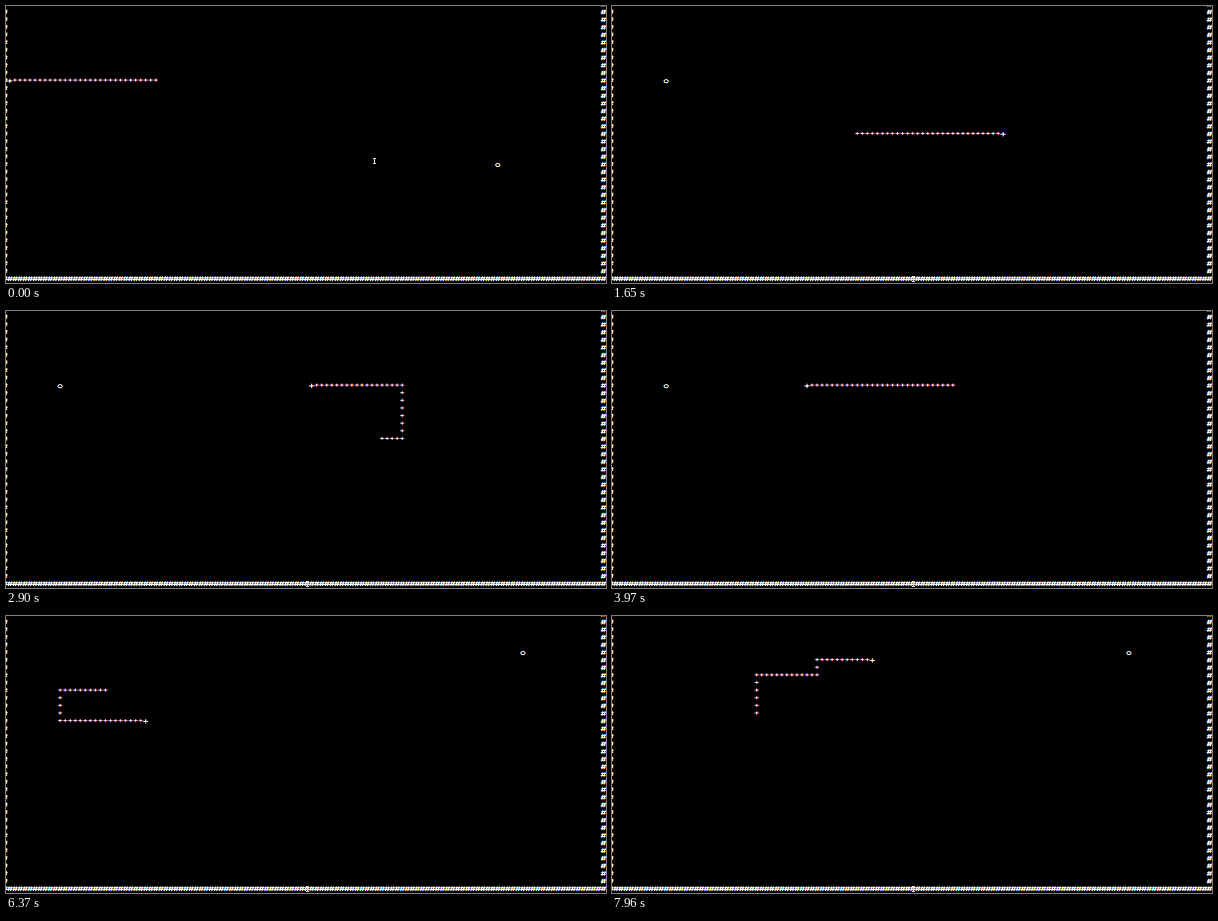
Animation, 600 px wide and 277 px high, one loop 8000 ms. Source, as an HTML page with a canvas:

```html
<!DOCTYPE html>
<html lang="en">
<head>
<meta charset="utf-8">
<title>Terminal snake</title>
<style>
  html, body { margin: 0; width: 100%; height: 100%; overflow: hidden; background: #000; }
  canvas { display: block; width: 600px; height: 277px; }
</style>
</head>
<body>
<canvas id="stage" width="600" height="277"></canvas>
<script>
const ctx = document.getElementById('stage').getContext('2d');
const LOOP = 8000, RESTART = 760, FIRST_STEP = 740, STEP = 48.9;
const CELL_W = 5.03, CELL_H = 7.62, LEFT = 3.8, TOP = 74.1;
const LENGTH = 30, MEAL = 94;

// Runs of [dx, dy, cells] from the spawn point.
const route = [
  [1, 0, 19], [0, -1, 7], [-1, 0, 68], [0, 1, 4],
  [1, 0, 18], [0, -1, 6], [1, 0, 12], [0, -1, 2], [1, 0, 30]
];

function walk(col, row, tail, runs) {
  const cells = [];
  for (let i = tail - 1; i >= 0; i--) cells.push([col - i, row]);
  for (const [dx, dy, count] of runs) {
    for (let i = 0; i < count; i++) cells.push([col += dx, row += dy]);
  }
  return cells;
}

const trail = walk(59, 7, LENGTH, route);
const crashed = Array.from({ length: LENGTH }, (_, i) => [LENGTH - 1 - i, 0]);

// Strokes of each terminal character, relative to its centre.
const shapes = {
  wall: new Path2D('M-2.7 .9H2.3M-2.2-.9H2.8M-1.6 2.4L-.4-2.4M.6 2.4L1.8-2.4'),
  body: new Path2D('M-2.1 0H2.1M0-1.6V1.6'),
  head: new Path2D('M-2.6 0H2.6M0-2.2V2.2'),
  food: new Path2D()
};
shapes.food.ellipse(0, 0, 2.2, 1.6, 0, 0, Math.PI * 2);

const drop = { wall: 0.5, body: 0, head: 0.8, food: 1.1 };
const white = [255, 255, 255], pink = [255, 165, 205];

// Red and blue are offset to give subpixel colour fringes.
function glyph(g, name, col, row, tone = white) {
  g.globalCompositeOperation = 'lighter';
  g.lineWidth = 1;
  tone.forEach((level, i) => {
    const rgb = [0, 0, 0];
    rgb[i] = level;
    g.strokeStyle = `rgb(${rgb})`;
    g.save();
    g.translate(LEFT + col * CELL_W + (1 - i) / 3, TOP + row * CELL_H + drop[name]);
    g.stroke(shapes[name]);
    g.restore();
  });
}

function makeWalls() {
  const layer = document.createElement('canvas');
  layer.width = 600;
  layer.height = 277;
  const g = layer.getContext('2d');
  g.fillRect(0, 0, 600, 277);
  for (let row = -10; row < 26; row++) {
    glyph(g, 'wall', -1, row);
    glyph(g, 'wall', 118, row);
  }
  for (let col = -1; col <= 118; col++) glyph(g, 'wall', col, 26);
  return layer;
}

const walls = makeWalls();

function drawSnake(cells) {
  cells.forEach(([col, row], i) => {
    if (i === cells.length - 1) glyph(ctx, 'head', col, row);
    else glyph(ctx, 'body', col, row, pink);
  });
}

function drawPointer(t) {
  const p = Math.min(1, Math.floor(t / 30) / 11);
  const e = p * p * (3 - 2 * p);
  const x = t < RESTART ? Math.round(368 - 62 * e) : 301;
  const y = Math.round(152 + 118 * e);
  ctx.fillStyle = '#ddd';
  ctx.fillRect(x, y, 1, 6);
  ctx.fillRect(x - 1, y, 3, 1);
  ctx.fillRect(x - 1, y + 5, 3, 1);
}

function draw(t) {
  ctx.globalCompositeOperation = 'source-over';
  ctx.drawImage(walls, 0, 0);
  if (t < RESTART) {
    drawSnake(crashed);
    glyph(ctx, 'food', 97, 11);
  } else {
    const n = Math.floor((t - FIRST_STEP) / STEP);
    const fed = n >= MEAL;
    drawSnake(trail.slice(n - (fed ? 1 : 0), n + LENGTH));
    if (fed) glyph(ctx, 'food', 102, -5);
    else glyph(ctx, 'food', 10, 0);
  }
  ctx.globalCompositeOperation = 'source-over';
  drawPointer(t);
}

const start = performance.now();
function tick() {
  draw((performance.now() - start) % LOOP);
  requestAnimationFrame(tick);
}
tick();
</script>
</body>
</html>
```
